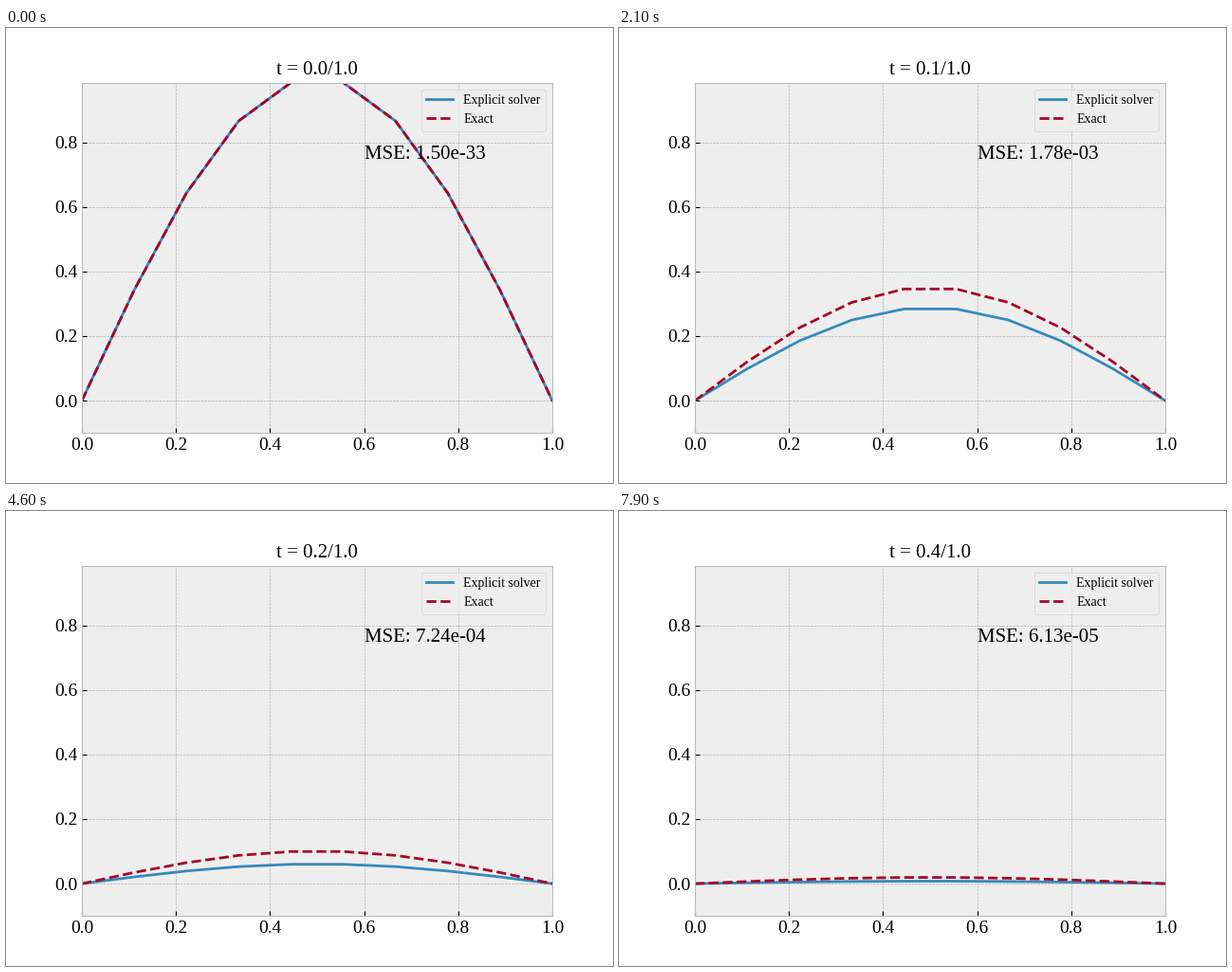
A matplotlib script that plays this animation: 640x480 px, repeating every 8 s.

```python
import numpy as np
import matplotlib.pyplot as plt
from matplotlib.animation import FuncAnimation

plt.style.use("bmh")
plt.rcParams.update({
    "font.family": "Liberation Serif",
    "axes.titlesize": 15,
    "xtick.labelsize": 14,
    "ytick.labelsize": 14,
    "legend.fontsize": 10,
})

FRAMES = 80
T_END = 1.0
R = 0.5  # diffusion number of the explicit scheme

x = np.linspace(0, 1, 10)
times = np.linspace(0, T_END, 199)


def exact(t):
    return np.exp(-np.pi**2 * t) * np.sin(np.pi * x)


def solve():
    """Explicit heat equation; the first two rows hold the initial state."""
    u = np.zeros((FRAMES, x.size))
    u[:2, 1:-1] = np.sin(np.pi * x[1:-1])
    for n in range(1, FRAMES - 1):
        lap = u[n, 2:] - 2 * u[n, 1:-1] + u[n, :-2]
        u[n + 1, 1:-1] = u[n, 1:-1] + R * lap
    return u


u = solve()

fig, ax = plt.subplots(figsize=(6.4, 4.8), dpi=100)
solver_line, = ax.plot(x, u[0], label="Explicit solver")
exact_line, = ax.plot(x, exact(0), "--", label="Exact")
ax.set_xlim(0, 1)
ax.set_ylim(-0.1, u[0].max())
ax.set_xticks(np.arange(0, 1.1, 0.2))
ax.set_yticks(np.arange(0, 0.9, 0.2))
ax.legend(loc="upper right")
title = ax.set_title("")
mse_text = ax.text(0.6, 0.75, "", fontsize=15)


def update(n):
    t = times[n]
    ref = exact(t)
    solver_line.set_ydata(u[n])
    exact_line.set_ydata(ref)
    title.set_text(f"t = {t:.1f}/{T_END:.1f}")
    mse_text.set_text(f"MSE: {np.mean((u[n] - ref)**2):.2e}")
    return solver_line, exact_line, title, mse_text


anim = FuncAnimation(fig, update, frames=FRAMES, interval=100,
                     repeat=True, repeat_delay=0, blit=False)
plt.show()
```
